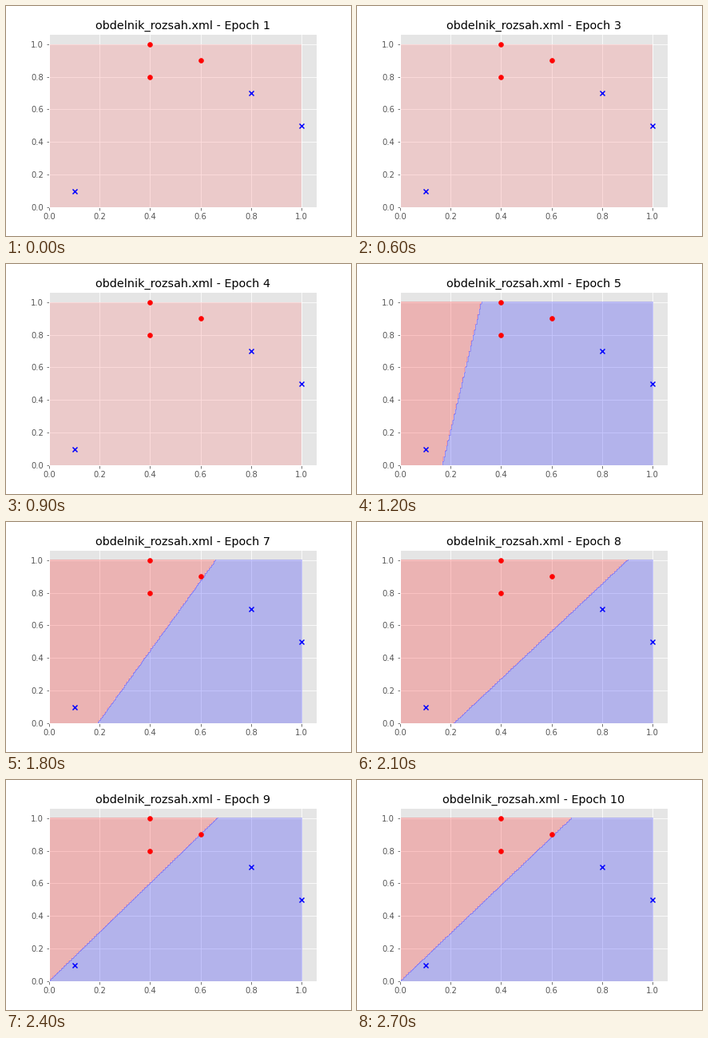
Recreate the animation shown at these times as a matplotlib script. Size 432 by 288 pixels, loop 3 s.

```python
import numpy as np
import matplotlib.pyplot as plt
from matplotlib.animation import FuncAnimation

plt.style.use("ggplot")
plt.rcParams["font.family"] = "DejaVu Sans"

EPOCHS, INTERVAL = 10, 300
FIRST_SPLIT = 4  # epoch index at which the classes first separate
START = np.array([6.0, -0.93, -1.0])  # weights for x, y and bias at that epoch
ALPHA = 0.25

# Training samples in presentation order: x, y, class (1 is blue, -1 is red)
SAMPLES = [
    (0.4, 0.8, -1),
    (0.4, 1.0, -1),
    (0.1, 0.1, 1),
    (0.6, 0.9, -1),
    (0.8, 0.7, 1),
    (1.0, 0.5, 1),
]

axis = np.linspace(0, 1, 201)
grid_x, grid_y = np.meshgrid(axis, axis)

fig = plt.figure(figsize=(6, 4), dpi=72, facecolor="white")
ax = fig.add_axes([0.125, 0.125, 0.775, 0.755])


def train(epochs):
    """Perceptron weights after the given number of further epochs."""
    weights = START.copy()
    for _ in range(epochs):
        for x, y, label in SAMPLES:
            sample = np.array([x, y, 1])
            if label * (weights @ sample) <= 0:
                weights += label * sample
    return weights


def draw_regions(index):
    if index < FIRST_SPLIT:
        ax.contourf(grid_x, grid_y, np.zeros_like(grid_x), levels=[-1, 1],
                    colors=["#ff7a7a"], alpha=ALPHA, zorder=1)
        return
    wx, wy, bias = train(index - FIRST_SPLIT)
    side = np.where(wx * grid_x + wy * grid_y + bias > 0, 1, -1)
    ax.contourf(grid_x, grid_y, side, levels=np.linspace(-1, 1, 9),
                cmap="bwr_r", alpha=ALPHA, zorder=1)


def draw_points(label, color, marker):
    points = [(x, y) for x, y, kind in SAMPLES if kind == label]
    ax.scatter(*zip(*points), c=color, marker=marker, zorder=2)


def draw(index):
    ax.clear()
    draw_regions(index)
    draw_points(-1, "red", "o")
    draw_points(1, "blue", "x")
    ax.set(xlim=(0, 1.059), ylim=(0, 1.064))
    ax.set_xticks(np.arange(6) / 5)
    ax.set_yticks(np.arange(6) / 5)
    ax.set_title(f"obdelnik_rozsah.xml - Epoch {index + 1}")
    return ax.get_children()


anim = FuncAnimation(fig, draw, frames=EPOCHS, interval=INTERVAL,
                     init_func=lambda: draw(0), repeat=True, repeat_delay=0)
plt.show()
```
